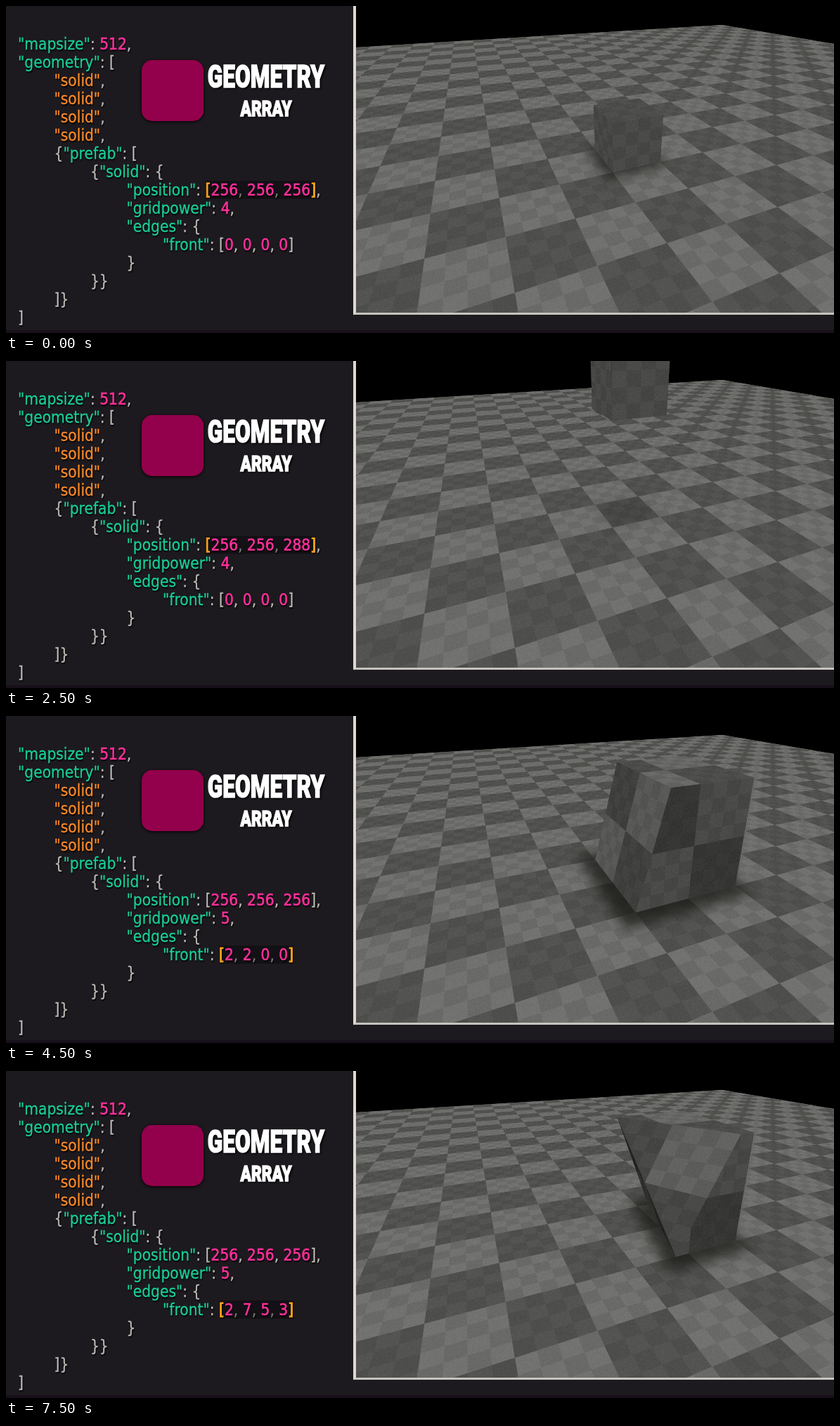
These frames come from a looping animation (1178 px wide and 466 px high, 8 s). An HTML page with a canvas:

```html
<!DOCTYPE html>
<html lang="en">
<head>
<meta charset="utf-8">
<title>Geometry array</title>
<style>
  html, body { margin: 0; width: 100%; height: 100%; overflow: hidden; background: #1d1a1f; }
  #stage { position: relative; width: 1178px; height: 466px; overflow: hidden; background: #1d1a1f; }
  #stage > * { position: absolute; margin: 0; }
  #code {
    left: 17px; top: 41px; color: #bdbcb6; white-space: pre;
    font: 22.5px/26px "DejaVu Sans", sans-serif;
    transform: scaleX(.9); transform-origin: 0 0; /* condensed face */
    text-shadow: 1px 2px 2px #000; -webkit-text-stroke: .3px;
  }
  #code i { font-style: normal; color: #18d096; }
  #code u { text-decoration: none; color: #ff8b28; }
  #code b { font-weight: 400; color: #ff309c; -webkit-text-stroke: .6px; }
  #code em { font-style: normal; }
  #code .on { background: #131115; color: #777; }
  #code .on s { color: #ffa41c; -webkit-text-stroke: 1px; }
  #code s { text-decoration: none; }
  #mark { left: 193px; top: 77px; width: 88px; height: 87px; border-radius: 15px; background: #93004b; box-shadow: 0 1px 4px #000; }
  .title {
    left: 370px; color: #fff; font-family: Roboto, sans-serif; font-weight: 900; line-height: 1;
    transform: translateX(-50%) scaleX(.71); text-shadow: 3px 2px 3px #000; -webkit-text-stroke: 1.6px #fff;
  }
  #view { left: 494px; top: 0; border: solid #dedad2; border-width: 0 0 3px 4px; border-bottom-color: #c6c4be; }
  #foot { left: 0; bottom: 0; width: 100%; height: 4px; background: #170f19; }
</style>
</head>
<body>
<div id="stage">
  <div id="foot"></div>
  <div id="code"></div>
  <div id="mark"></div>
  <div class="title" style="top:79px;font-size:44.5px">GEOMETRY</div>
  <div class="title" style="top:130px;font-size:32px">ARRAY</div>
  <canvas id="view" width="680" height="437"></canvas>
</div>
<script>
const W = 680, H = 437, LEFT = 498, STEP = 500;
const NONE = [0, 0, 0, 0];

// position, grid power, front edges, highlighted value
const steps = [
  [[256, 256, 256], 4, NONE, 'pos'],
  [[272, 256, 256], 4, NONE, 'pos'],
  [[272, 272, 256], 4, NONE, 'pos'],
  [[256, 272, 256], 4, NONE, 'pos'],
  [[256, 256, 272], 4, NONE, 'pos'],
  [[256, 256, 288], 4, NONE, 'pos'],
  [[256, 256, 288], 5, NONE, 'power'],
  [[256, 256, 256], 5, NONE, 'pos'],
  ...[[1, 0, 0, 0], [2, 2, 0, 0], [3, 3, 1, 0], [3, 4, 1, 0],
      [4, 4, 2, 1], [4, 5, 3, 1], [3, 6, 4, 2], [2, 7, 5, 3]]
    .map(e => [[256, 256, 256], 5, e, 'edges'])
];

// Three-point perspective: one unit is 16 map units, origin at 256,256,256
const depth = ([u, v, w]) => 1 + .0511 * u - .1174 * v - .06 * w;
function project(p) {
  const [u, v, w] = p, d = depth(p);
  return [
    (838.2 + 107.1 * u - 76.3 * v - 52.2 * w) / d,
    (205 - 2.018 * u + 4.637 * v - 72.4 * w) / d
  ];
}

function layer(w, h) {
  const c = document.createElement('canvas');
  c.width = w; c.height = h;
  return c.getContext('2d');
}

function trace(g, pts) {
  g.beginPath();
  pts.forEach(([x, y]) => g.lineTo(x, y));
  g.closePath();
}

const gray = n => `rgb(${n},${n + 1},${n - 2})`;

function makeGrain() {
  const g = layer(256, 256), img = g.createImageData(256, 256);
  let seed = 7;
  for (let i = 0; i < img.data.length; i += 4) {
    seed = (seed * 1664525 + 1013904223) >>> 0;
    const n = seed / 2 ** 32;
    img.data.fill(n > .5 ? 255 : 0, i, i + 3);
    img.data[i + 3] = Math.abs(n - .5) * 20;
  }
  g.putImageData(img, 0, 0);
  return g.canvas;
}
const grain = makeGrain();

// Two-level checker; at(s, t) maps texture cells to space
function checker(g, at, [s0, s1, t0, t1], shade, odd) {
  const cell = (s, t, n) => {
    const pts = [at(s, t), at(s + n, t), at(s + n, t + n), at(s, t + n)];
    if (pts.some(p => depth(p) < .15)) return;
    trace(g, pts.map(project));
    g.fill();
  };
  for (let s = s0; s < s1; s++) for (let t = t0; t < t1; t++) {
    const light = (s + t + odd) & 1;
    g.fillStyle = gray((light ? 116 : 85) * shade);
    cell(s, t, 1);
    g.fillStyle = gray((light ? 107 : 79) * shade);
    for (let k = 0; k < 16; k++) {
      const i = k >> 2, j = k & 3;
      if ((i + j) & 1) cell(s + i / 4, t + j / 4, .25);
    }
  }
}

function surface(g, outline, at, range, shade, odd) {
  g.save();
  trace(g, outline);
  g.fillStyle = gray(92 * shade);
  g.fill();
  g.clip();
  checker(g, at, range, shade, odd);
  g.fillStyle = g.createPattern(grain, 'repeat');
  g.fillRect(LEFT, 0, W, H);
  g.restore();
}

function makeFloor() {
  const g = layer(W, H);
  g.fillRect(0, 0, W, H);
  g.translate(-LEFT, 0);
  surface(g, [[498, 59], [1019, 27], [1178, 54], [1178, 437], [498, 437]],
    (u, v) => [u, v, 0], [-9, 19, -19, 6], .98, 0);
  return g.canvas;
}

const area = pts => pts.reduce((sum, [x, y], i) => {
  const [a, b] = pts[(i + 1) % pts.length];
  return sum + x * b - y * a;
}, 0);

function drawBlock(g, [x, y, z], power, edges) {
  const [u, v, w] = [x, y, z].map(c => (c - 256) / 16);
  const n = 2 ** (power - 4), U = u + n, V = v + n, T = w + n;
  const [tb, tf, bb, bf] = edges.map(e => u + e * n / 8);
  const topBack = [tb, v, T], topFront = [tf, V, T], lowBack = [bb, v, w], lowFront = [bf, V, w];
  const face = (corners, ...rest) => {
    const pts = corners.map(project);
    if (area(pts) > 0) surface(g, pts, ...rest);
  };
  // left side split along a diagonal, lit by its upward tilt
  const slope = (corners, base, dv, dw, v0, w0) => {
    const shade = .62 + .6 * dw / Math.hypot(1, dv, dw);
    face(corners, (s, t) => [base + dv * (s - v0) + dw * (t - w0), s, t], [v, V, w, T], shade, 1);
  };

  g.save();
  g.filter = 'blur(9px)';
  g.fillStyle = `rgba(20,20,18,${w ? .35 / w : .7})`;
  const m = w ? 0 : .16 * n;
  trace(g, [[bb - m, v - m, 0], [U, v - m, 0], [U + m / 2, V + m, 0], [bf - m, V + m, 0]].map(project));
  g.fill();
  g.restore();

  slope([topBack, lowFront, lowBack], bb, (bf - bb) / n, (tb - bb) / n, v, w);
  slope([topBack, topFront, lowFront], tf, (tf - tb) / n, (tf - bf) / n, V, T);
  face([topFront, [U, V, T], [U, V, w], lowFront], (s, t) => [s, V, t], [u, U, w, T], .64, 1);
  face([topBack, [U, v, T], [U, V, T], topFront], (s, t) => [s, t, T], [u, U, v, V], .92, 0);
}

function codeHtml(pos, power, edges, active) {
  const list = (id, a) => `<em class="${id === active ? 'on' : ''}"><s>[</s>${a.map(n => `<b>${n}</b>`).join(', ')}<s>]</s></em>`;
  const key = k => `<i>"${k}"</i>: `;
  const rows = [
    [0, key('mapsize') + '<b>512</b>,'],
    [0, key('geometry') + '['],
    ...Array(4).fill([1, '<u>"solid"</u>,']),
    [1, '{' + key('prefab') + '['],
    [2, '{' + key('solid') + '{'],
    [3, key('position') + list('pos', pos) + ','],
    [3, key('gridpower') + `<em class="${active === 'power' ? 'on' : ''}"><b>${power}</b></em>,`],
    [3, key('edges') + '{'],
    [4, key('front') + list('edges', edges)],
    [3, '}'], [2, '}}'], [1, ']}'], [0, ']']
  ];
  return rows.map(([level, s]) => ' '.repeat(level * 8) + s).join('\n');
}

const view = document.getElementById('view').getContext('2d');
const code = document.getElementById('code');
const floor = makeFloor();
const start = performance.now();
let shown = -1;

function tick() {
  const i = Math.floor((performance.now() - start) / STEP) % steps.length;
  if (i !== shown) {
    shown = i;
    const [pos, power, edges] = steps[i];
    view.setTransform(1, 0, 0, 1, 0, 0);
    view.drawImage(floor, 0, 0);
    view.translate(-LEFT, 0);
    drawBlock(view, pos, power, edges);
    code.innerHTML = codeHtml(...steps[i]);
  }
  requestAnimationFrame(tick);
}
tick();
</script>
</body>
</html>
```
